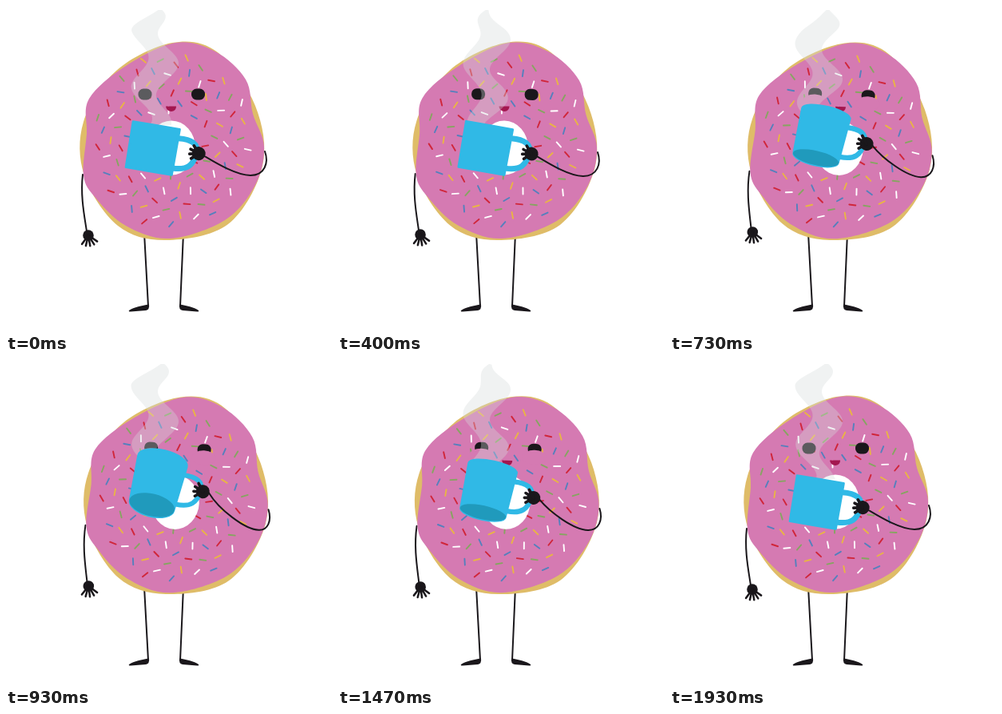
These frames come from a looping animation (408 by 408 pixels, 1.99 s). An HTML page with a canvas:

```html
<!DOCTYPE html>
<html lang="en">
<head>
<meta charset="utf-8">
<title>Doughnut sipping from a mug</title>
<style>
html, body { margin: 0; width: 100%; height: 100%; overflow: hidden; background: #fff; }
canvas { display: block; width: 408px; height: 408px; }
</style>
</head>
<body>
<canvas id="stage" width="408" height="408"></canvas>
<script>
const ctx = document.getElementById('stage').getContext('2d');
const LOOP = 1990, STEPS = 30, TAU = Math.PI * 2;
const INK = '#1a171b', PINK = '#d57ab2', TAN = '#dfbc68', BLUE = '#30b9e6', DARK_BLUE = '#209abc', LIPS = '#a3174f';
const CANDY = ['#ffffff', '#d0263a', '#e9b544', '#5580bd', '#86a561'];

// Key points of the closed outlines
const DOUGH = [[208,46],[265,58],[312,125],[321,200],[278,273],[200,293],[140,275],[98,212],[97,145],[138,81]];
const ICING = [[212,46],[262,57],[300,92],[309,135],[323,176],[312,224],[274,268],[205,291],[150,275],
  [112,240],[97,212],[101,160],[104,116],[150,75]];

const clamp = v => Math.max(0, Math.min(1, v));
const ease = (t, from, to) => { const x = clamp((t - from) / (to - from)); return x * x * (3 - 2 * x); };
const mix = (a, b, k) => a + (b - a) * k;

function fill(color) { ctx.fillStyle = color; ctx.fill(); }

function stroke(color, width, path) {
  ctx.strokeStyle = color;
  ctx.lineWidth = width;
  if (path) ctx.stroke(new Path2D(path));
  else ctx.stroke();
}

function oval(x, y, rx, ry, color) {
  ctx.beginPath();
  ctx.ellipse(x, y, rx, ry, 0, 0, TAU);
  fill(color);
}

// Smooth closed curve through all points
function blob(points, color) {
  const n = points.length, at = i => points[(i + n) % n];
  ctx.beginPath();
  ctx.moveTo(...points[0]);
  for (let i = 0; i < n; i++) {
    const [a, b, c, d] = [at(i - 1), at(i), at(i + 1), at(i + 2)];
    ctx.bezierCurveTo(b[0] + (c[0] - a[0]) / 6, b[1] + (c[1] - a[1]) / 6,
      c[0] - (d[0] - b[0]) / 6, c[1] - (d[1] - b[1]) / 6, c[0], c[1]);
  }
  fill(color);
}

function hand(x, y, size, fingers, reach, from, to, width) {
  oval(x, y, size, size, INK);
  for (let i = 0; i < fingers; i++) {
    const a = mix(from, to, i / (fingers - 1));
    stroke(INK, width, `M${x} ${y}L${x + reach * Math.cos(a)} ${y + reach * Math.sin(a)}`);
  }
}

function legs() {
  stroke(INK, 2, 'M173 284L178 376M222 284L218 376');
  ctx.fillStyle = INK;
  ctx.fill(new Path2D('M179 373.5C170 375 160 377 154 381Q153 382.5 156 382.5L175 381Q180 380 179 373.5Z'));
  ctx.fill(new Path2D('M217 373.5C226 375 235 377 241 381Q242 382.5 239 382.5L221 381Q216 380 217 373.5Z'));
}

// Golden-angle spiral around the hole
function sprinkles() {
  const count = 118, golden = TAU * 0.381966;
  for (let i = 15; i < count; i++) {
    const r = 0.93 * Math.sqrt(i / count), a = i * golden, turn = i * i * 0.37;
    const x = 208 + 106 * r * Math.cos(a), y = 169 + 117 * r * Math.sin(a);
    const dx = 4 * Math.cos(turn), dy = 4 * Math.sin(turn);
    ctx.beginPath();
    ctx.moveTo(x - dx, y - dy);
    ctx.lineTo(x + dx, y + dy);
    stroke(CANDY[i % CANDY.length], 1.9);
  }
}

function face(squint) {
  for (const x of [174, 240.5]) {
    ctx.beginPath();
    ctx.roundRect(x - 8.5, 103.5, 17, 14, 6.5);
    fill(INK);
    if (squint > 0) oval(x, 127.5 - 7 * squint, 15, 9, PINK);
  }
  ctx.beginPath();
  ctx.moveTo(200, 125.5);
  ctx.lineTo(213, 125.5);
  ctx.bezierCurveTo(213, 134, 201, 134, 200, 125.5);
  fill(LIPS);
}

function body(sip) {
  stroke(INK, 2, 'M96 211C93 238 98 262 101 282');
  hand(103, 287, 6.8, 5, 13.5, 0.6, 2.2, 2.5);
  blob(DOUGH, TAN);
  blob(ICING, PINK);
  sprinkles();
  oval(207, 177.5, 30, 34, '#fff');
  face(clamp(sip * 2.5));
}

// A ribbon whose two edges are waves that climb twice per loop
function steam(t, sip) {
  const turn = t / (LOOP / 2), end = 149 - 28 * sip;
  const wave = (y, y0) => Math.cos(TAU * ((y - y0) / 75 + turn));
  const tip = 198 - 17 * (0.5 + 0.5 * Math.cos(TAU * (turn - 0.236))) ** 2;
  const edge = (y, right) => {
    const low = clamp((y - 100) / 45);
    const x = right ? 203 + 13 * wave(y, 72) - 9 * low : 167.5 - 11 * wave(y, 102) + 5 * low;
    return mix(tip, x, Math.sqrt(ease(y, 3, 32)));
  };
  ctx.beginPath();
  for (let y = 5; y <= end; y++) ctx.lineTo(edge(y, false), y);
  for (let y = end; y >= 5; y--) ctx.lineTo(edge(y, true), y);
  fill('rgba(211,218,217,.35)');
}

function arm(sip) {
  const x = mix(306, 313, sip), y = mix(212, 208, sip);
  stroke(INK, 2, `M324 182C329 196 324 ${y} ${x} ${y}C${x - 18} ${y} 262 ${mix(196, 184, sip)} 248.5 ${188 - 24 * sip}`);
}

function mug(sip) {
  const rim = 29.5 + 1.5 * sip, base = 29 - sip, h = 28.8 - 0.5 * sip;
  ctx.save();
  ctx.translate(183.5, 178 - 23.5 * sip);
  ctx.rotate(0.166 + 0.03 * sip);
  stroke(BLUE, 7 - sip, 'M30 -17.5C46 -19 56 -15 55 -3C54 12 48 20 29 20.5');
  ctx.beginPath();
  ctx.ellipse(0, -h, rim, 13 * sip, 0, Math.PI, TAU);
  ctx.ellipse(0, h, base, 14 * sip, 0, 0, Math.PI);
  ctx.closePath();
  fill(BLUE);
  stroke(BLUE, 3);
  if (sip > 0.1) oval(0, h, base + 1, 14 * sip, DARK_BLUE);
  hand(58, -3, 8.5, 4, 11.5, 2.4, 4, 3.6);
  ctx.restore();
}

// Lean the drawing about the doughnut's lowest point
function leaning(angle, paint) {
  ctx.save();
  ctx.translate(200, 292);
  ctx.rotate(angle);
  ctx.translate(-200, -292);
  paint();
  ctx.restore();
}

function draw(t) {
  const lean = 0.042 * (ease(t, 270, 700) - ease(t, 1300, 1780));
  const sip = ease(t, 480, 900) - ease(t, 1300, 1680);
  ctx.fillStyle = '#fff';
  ctx.fillRect(0, 0, 408, 408);
  ctx.lineCap = ctx.lineJoin = 'round';
  legs();
  leaning(lean, () => body(sip));
  steam(t, sip);
  leaning(lean, () => { arm(sip); mug(sip); });
}

const start = performance.now();
function tick() {
  const t = (performance.now() - start) % LOOP, step = LOOP / STEPS;
  draw(Math.min(STEPS - 1, Math.floor((t + 10) / step)) * step);
  requestAnimationFrame(tick);
}
tick();
</script>
</body>
</html>
```
